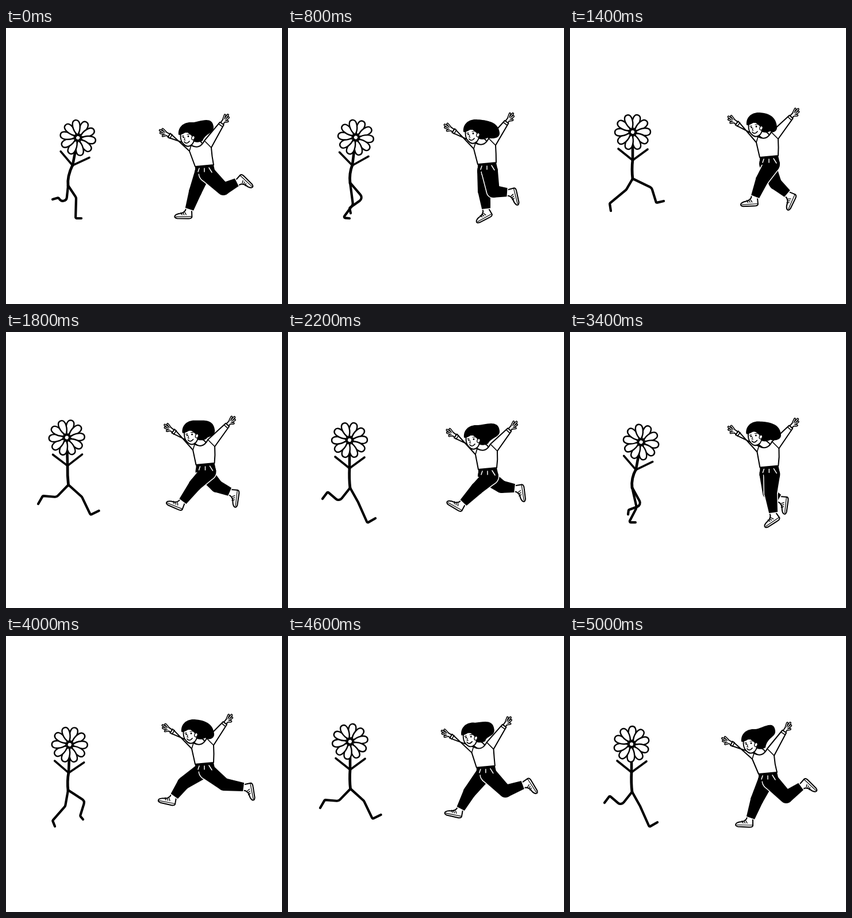
An HTML page with a canvas that plays this animation: 480 by 480 pixels, repeating every 5.2 s.

```html
<!DOCTYPE html>
<html lang="en">
<head>
<meta charset="utf-8">
<title>Running together</title>
<style>
  html, body { margin: 0; width: 100%; height: 100%; overflow: hidden; background: #fff; }
  canvas { display: block; width: 100vmin; height: 100vmin; }
</style>
</head>
<body>
<canvas id="stage" width="480" height="480"></canvas>
<script>
const ctx = document.getElementById('stage').getContext('2d');
const STEP = 200, STEPS = 26, STRIDE = 14;
const INK = '#000', PAPER = '#fff';

// Flower: step, shoulder x y, tilt, spin, hip x y
const flowerBody = [
  [0, 116, 238, 11, 0, 108, 274],
  [4, 112, 238, 7, 0, 108, 269],
  [7, 109, 229, 0, 0, 109, 262],
  [11, 107, 236, 0, 0, 108, 271],
  [14, 118, 240, 15, 0, 108, 274],
  [18, 113, 238, 8, 0, 108, 269],
  [20, 109, 237, 2, 0, 108, 268],
  [21, 109, 229, 0, 0, 109, 262],
  [25, 107, 236, 0, -14, 108, 271]
];
// One leg over two strides: step, knee, ankle, toe
const flowerLeg = [
  [0, 122, 296, 138, 332, 152, 324],
  [3, 122, 295, 121, 331, 131, 331],
  [7, 113, 307, 96, 330, 107, 331],
  [9, 103, 296, 81, 321, 85, 331],
  [10, 98, 281, 69, 305, 71, 318],
  [12, 88, 287, 64, 285, 56, 299],
  [14, 89, 295, 69, 278, 60, 290],
  [17, 104, 312, 91, 295, 81, 298],
  [21, 131, 296, 107, 313, 109, 322],
  [23, 137, 287, 129, 313, 134, 319],
  [24, 142, 278, 150, 304, 163, 301]
];
// Girl: step, waist, chest, head, left fingertip, right fingertip, hair tip from head
const girlBody = [
  [0, 345, 240, 335, 205, 315, 194, 268, 178, 386, 151, 46, -22],
  [4, 346, 236, 339, 201, 320, 189, 272, 168, 391, 149, 48, -7],
  [7, 346, 224, 340, 190, 322, 177, 275, 154, 397, 141, 38, -5],
  [11, 347, 238, 342, 204, 321, 192, 276, 170, 397, 157, 47, -20],
  [14, 347, 239, 342, 204, 322, 191, 277, 167, 400, 158, 50, -16],
  [18, 346, 232, 341, 197, 321, 183, 274, 163, 394, 149, 44, -5],
  [20, 345, 222, 339, 187, 320, 175, 272, 155, 392, 138, 42, -5],
  [22, 344, 223, 337, 189, 318, 176, 269, 159, 389, 138, 42, -12],
  [25, 344, 239, 333, 205, 313, 192, 265, 178, 383, 151, 44, -27]
];
// step, knee, ankle, foot angle
const farLeg = [
  [0, 329, 285, 318, 318, 178],
  [4, 341, 283, 345, 317, 150],
  [7, 357, 270, 380, 290, 113],
  [11, 371, 269, 397, 272, 80],
  [14, 357, 279, 385, 273, 58],
  [17, 346, 280, 366, 291, 95],
  [20, 309, 256, 291, 281, 190],
  [25, 325, 285, 313, 319, 180]
];
const nearLeg = [
  [0, 378, 280, 404, 267, 42],
  [4, 357, 284, 384, 286, 75],
  [7, 334, 264, 321, 296, 175],
  [11, 329, 272, 303, 299, 208],
  [14, 342, 282, 328, 319, 178],
  [17, 349, 280, 354, 317, 145],
  [20, 379, 258, 416, 263, 78],
  [23, 378, 270, 411, 258, 56],
  [25, 376, 280, 404, 260, 42]
];

// Smooth spline through keyed rows; wraps when a period is given.
function sample(keys, t, period) {
  const n = keys.length;
  const row = i => {
    if (!period) return keys[Math.max(0, Math.min(n - 1, i))];
    const lap = Math.floor(i / n), k = keys[i - lap * n];
    return [k[0] + lap * period, ...k.slice(1)];
  };
  let i = n - 1;
  while (i > 0 && keys[i][0] > t) i--;
  const [a, b, c, d] = [row(i - 1), row(i), row(i + 1), row(i + 2)];
  const span = c[0] - b[0];
  if (!span) return b.slice(1);
  const u = (t - b[0]) / span, v = 1 - u;
  return b.slice(1).map((p, j) => {
    const q = c[j + 1];
    const m0 = (q - a[j + 1]) / (c[0] - a[0]) * span;
    const m1 = (d[j + 1] - p) / (d[0] - b[0]) * span;
    return v * v * (1 + 2 * u) * p + u * v * v * m0 + u * u * (3 - 2 * u) * q - u * u * v * m1;
  });
}

const rad = deg => deg * Math.PI / 180;

function stroke(width, color = INK) {
  ctx.lineWidth = width;
  ctx.strokeStyle = color;
  ctx.stroke();
}

function fill(color) {
  ctx.fillStyle = color;
  ctx.fill();
}

function trace(points, closed) {
  ctx.beginPath();
  points.forEach(p => ctx.lineTo(p[0], p[1]));
  if (closed) ctx.closePath();
}

function line(width, color, ...points) {
  trace(points);
  stroke(width, color);
}

function disc(x, y, r) {
  ctx.beginPath();
  ctx.arc(x, y, r, 0, 7);
}

function within(x, y, angle, draw) {
  ctx.save();
  ctx.translate(x, y);
  ctx.rotate(angle);
  draw();
  ctx.restore();
}

function drawFlowerLeg(hx, hy, t) {
  const [kx, ky, ax, ay, tx, ty] = sample(flowerLeg, t % (2 * STRIDE), 2 * STRIDE);
  ctx.beginPath();
  ctx.moveTo(hx, hy);
  ctx.arcTo(kx, ky, ax, ay, 7);
  ctx.arcTo(ax, ay, tx, ty, 2);
  ctx.lineTo(tx, ty);
  stroke(4.2);
}

function drawFlower(step) {
  const [sx, sy, tilt, spin, hx, hy] = sample(flowerBody, step);
  const phase = step % STRIDE + 3;
  drawFlowerLeg(hx, hy, phase);
  drawFlowerLeg(hx, hy, phase + STRIDE);
  ctx.beginPath();
  ctx.moveTo(sx, sy);
  ctx.quadraticCurveTo(hx - 2, hy - 16, hx, hy + 1);
  stroke(4.8);
  within(sx, sy, rad(tilt), () => {
    line(3.6, INK, [-25, -19], [0, 1], [26, -18]);
    line(4.6, INK, [0, 1], [0, -22]);
    within(0, -48, rad(spin - 73), () => {
      for (let i = 0; i < 10; i++) {
        ctx.beginPath();
        ctx.moveTo(5, 0);
        ctx.bezierCurveTo(12, -7, 31, -10, 31, 0);
        ctx.bezierCurveTo(31, 10, 12, 7, 5, 0);
        fill(PAPER);
        stroke(2.4);
        ctx.rotate(Math.PI / 5);
      }
      disc(0, 0, 4.2);
      fill(PAPER);
      stroke(2.2);
    });
  });
}

function drawShoe(x, y, angle) {
  within(x, y, rad(angle), () => {
    ctx.scale(1, -1);
    ctx.beginPath();
    ctx.moveTo(-5, -4);
    ctx.lineTo(-5, 11);
    ctx.quadraticCurveTo(-4, 14, 2, 13.5);
    ctx.lineTo(21, 12.5);
    ctx.quadraticCurveTo(27, 11, 24, 7);
    ctx.quadraticCurveTo(20, 4, 14, 4);
    ctx.quadraticCurveTo(9, 3, 6, -1);
    ctx.lineTo(5, -4);
    fill(PAPER);
    stroke(2);
    line(1.2, INK, [-5, 10], [23, 9.5]);
    [7, 10.5, 14].forEach(k => line(1.4, INK, [k, 2.5], [k - 2, 6.5]));
  });
}

// Closed tapered shape between two widths.
function taper(x0, y0, r0, x1, y1, r1) {
  const a = Math.atan2(y1 - y0, x1 - x0), nx = -Math.sin(a), ny = Math.cos(a);
  trace([[x0 + nx * r0, y0 + ny * r0], [x1 + nx * r1, y1 + ny * r1],
    [x1 - nx * r1, y1 - ny * r1], [x0 - nx * r0, y0 - ny * r0]], true);
}

function drawTrouserLeg(hx, hy, [kx, ky, ax, ay, angle]) {
  drawShoe(ax, ay, angle);
  const len = Math.hypot(ax - kx, ay - ky);
  const cx = ax - (ax - kx) / len * 3, cy = ay - (ay - ky) / len * 3;
  const parts = [
    () => disc(hx, hy, 14),
    () => taper(hx, hy, 14, kx, ky, 11),
    () => disc(kx, ky, 11),
    () => taper(kx, ky, 11, cx, cy, 7.5)
  ];
  parts.forEach(part => { part(); stroke(3, PAPER); });
  parts.forEach(part => { part(); fill(INK); });
}

function drawHand(x, y, angle, side) {
  const fingers = [[15, -4], [18, 0], [15, 3.5]];
  within(x, y, angle, () => {
    ctx.scale(1, side);
    [[7.2, 4.2, INK], [3.4, 1.1, PAPER]].forEach(([palm, finger, color]) => {
      line(palm, color, [0, 0], [7, 0]);
      fingers.forEach(f => line(finger, color, [8, f[1] / 2], f));
      line(finger, color, [5, 2], [9, 6]);
    });
  });
}

function drawShirt(wx, wy, cx, cy, left, right) {
  const arm = (sx, sy, [tx, ty]) => {
    const a = Math.atan2(ty - sy, tx - sx);
    const x = sx + (tx - sx) * .7, y = sy + (ty - sy) * .7;
    const nx = -Math.sin(a) * 4, ny = Math.cos(a) * 4;
    return { a, x, y, ccw: [x + nx, y + ny], cw: [x - nx, y - ny],
      cuff: [[x - nx - Math.cos(a) * 4, y - ny - Math.sin(a) * 4],
        [x + nx - Math.cos(a) * 4, y + ny - Math.sin(a) * 4]] };
  };
  const l = arm(cx - 15, cy + 2, left), r = arm(cx + 16, cy - 4, right);
  drawHand(l.x, l.y, l.a, -1);
  drawHand(r.x, r.y, r.a, 1);

  const collarL = [cx - 13, cy - 1], collarR = [cx + 10, cy - 9];
  const pitL = [cx - 16, cy + 9], pitR = [cx + 22, cy + 3];
  trace([collarL, l.cw, l.ccw, pitL, [wx - 16, wy + 1]]);
  ctx.lineTo(wx + 16, wy - 2);
  ctx.quadraticCurveTo(cx + 23, cy + 18, ...pitR);
  ctx.lineTo(...r.ccw);
  ctx.lineTo(...r.cw);
  ctx.lineTo(...collarR);
  ctx.quadraticCurveTo(cx + 2, cy + 7, ...collarL);
  fill(PAPER);
  stroke(2);
  line(1.6, INK, ...l.cuff);
  line(1.6, INK, ...r.cuff);
  line(1.6, INK, collarL, pitL);
  line(1.6, INK, collarR, pitR);
}

function drawHead(x, y, tx, ty) {
  within(x, y, 0, () => {
    ctx.beginPath();
    ctx.moveTo(-15, -9);
    ctx.bezierCurveTo(-16, -22, -6, -31, 8, -30);
    ctx.bezierCurveTo(18, -29, tx - 2, ty - 22, tx, ty);
    ctx.bezierCurveTo(tx + 1, ty + 11, tx - 14, ty + 11, 27, 2);
    ctx.bezierCurveTo(20, 6, 14, 5, 8, 2);
    fill(INK);

    ctx.beginPath();
    ctx.moveTo(-11, -12);
    ctx.quadraticCurveTo(-13, 1, -7, 7);
    ctx.quadraticCurveTo(1, 16, 9, 8);
    ctx.quadraticCurveTo(14, 2, 11, -12);
    fill(PAPER);
    stroke(1.9);

    ctx.beginPath();
    ctx.moveTo(-15, -8);
    ctx.bezierCurveTo(-10, -8, -4, -11, -1, -14);
    ctx.bezierCurveTo(2, -10, 8, -9, 10, -2);
    ctx.lineTo(15, -4);
    ctx.lineTo(12, -22);
    ctx.lineTo(-8, -22);
    fill(INK);

    ctx.beginPath();
    ctx.ellipse(10.5, -3, 2.6, 3.6, .3, 0, 7);
    fill(PAPER);
    stroke(1.3);

    disc(-6.5, -4, 1.4);
    fill(INK);
    disc(2, -5.5, 1.4);
    fill(INK);
    line(1.2, INK, [-9, -6], [-6, -7]);
    line(1.2, INK, [0, -9], [4, -9]);
    line(1.1, INK, [-4, -3], [-5, 1], [-3, 1]);
    ctx.beginPath();
    ctx.moveTo(-5, 4);
    ctx.quadraticCurveTo(-1, 9, 4, 3);
    stroke(1.7);
  });
}

function drawGirl(step) {
  const [wx, wy, cx, cy, hx, hy, lx, ly, rx, ry, tx, ty] = sample(girlBody, step, STEPS);
  drawTrouserLeg(wx - 3, wy + 12, sample(farLeg, step, STEPS));
  drawTrouserLeg(wx + 5, wy + 13, sample(nearLeg, step, STEPS));
  trace([[wx - 16, wy + 1], [wx + 16, wy - 2], [wx + 19, wy + 12], [wx - 16, wy + 14]], true);
  fill(INK);
  const pleats = [[-9, 4, -11, 10], [0, 4, 0, 10], [8, 3, 13, 11]];
  pleats.forEach(([a, b, c, d]) => line(1.5, PAPER, [wx + a, wy + b], [wx + c, wy + d]));

  line(15, INK, [hx + 9, hy + 4], [cx, cy - 2]);
  line(11, PAPER, [hx + 9, hy + 4], [cx, cy - 2]);
  drawShirt(wx, wy, cx, cy, [lx, ly], [rx, ry]);
  drawHead(hx, hy, tx, ty);
}

function render(now) {
  const step = Math.floor(now / STEP) % STEPS;
  ctx.fillStyle = PAPER;
  ctx.fillRect(0, 0, 480, 480);
  ctx.lineCap = ctx.lineJoin = 'round';
  drawFlower(step);
  drawGirl(step);
}

const start = performance.now();
function tick() {
  render(performance.now() - start);
  requestAnimationFrame(tick);
}
tick();
</script>
</body>
</html>
```
